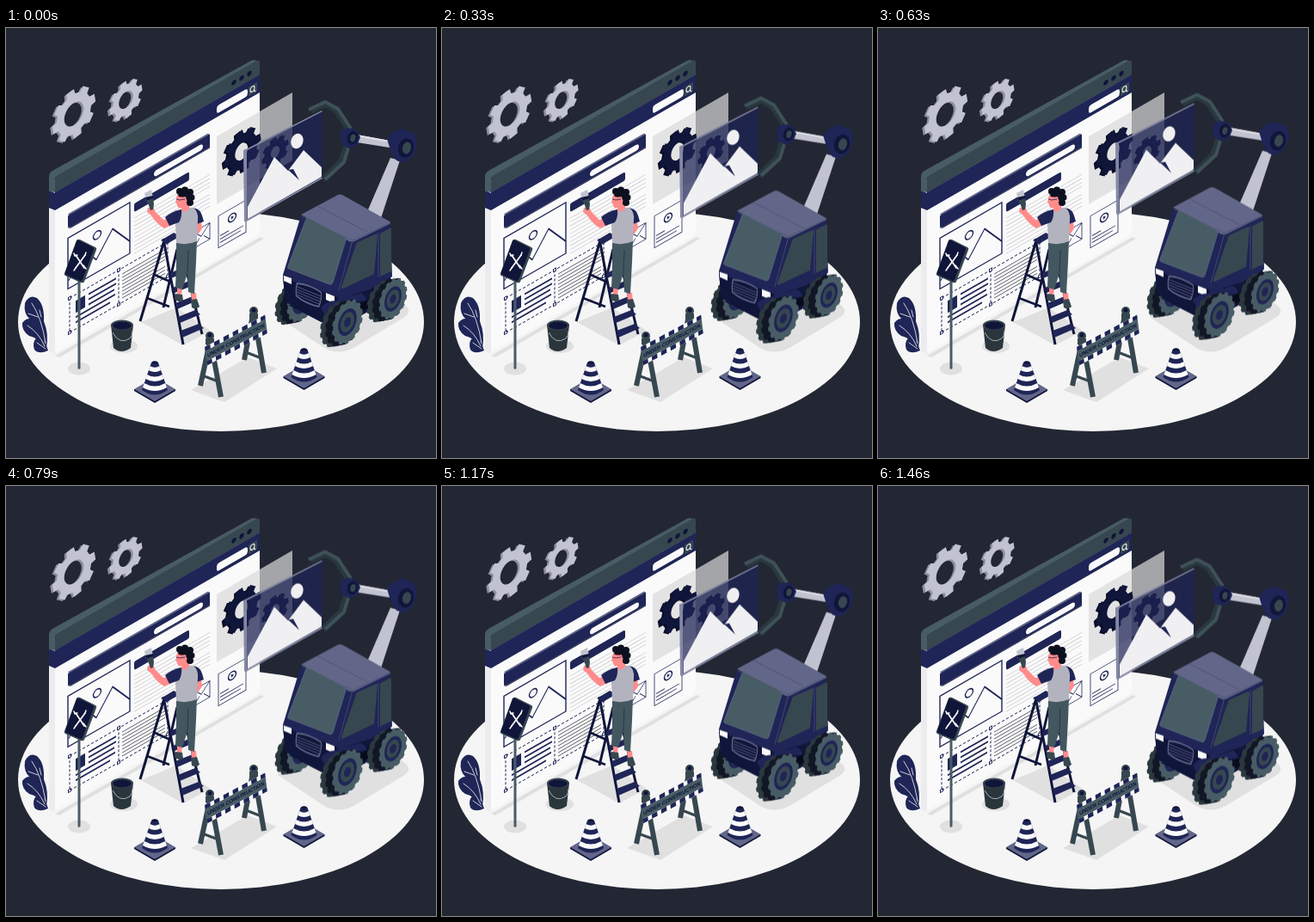
Recreate the animation shown at these times as an HTML page. Size 500 by 500 pixels, loop 1.5 s.

```html
<!DOCTYPE html>
<html lang="en">
<head>
<meta charset="utf-8">
<title>Under construction</title>
<style>
html, body { margin: 0; width: 100%; height: 100%; overflow: hidden; background: #232733; }
svg { display: block; width: 100%; height: 100%; }
.navy { fill: #1f2556; }
.deep { fill: #10153a; }
.slate { fill: #37474f; }
.steel { fill: #485c65; }
.dusk { fill: #62678a; }
.lav { fill: #c2c3d0; }
.white { fill: #fafafa; }
.shade { fill: #e0e0e1; }
.skin { fill: #ff8b8b; }
.ink { fill: none; stroke: #1f2556; stroke-width: 1.4; }
.dark { fill: none; stroke: #10153a; stroke-width: 3; }
.pale { fill: none; stroke: #fafafa; stroke-width: 1; }
.edge { fill: none; stroke: #62678a; stroke-width: .8; }
.thin { stroke-width: .8; }
.round { stroke-linecap: round; stroke-linejoin: round; }
#loader { animation: float 1.5s linear infinite; }
@keyframes float { 50% { transform: translateY(-10px); } }
</style>
</head>
<body>
<svg viewBox="0 0 500 500">
  <defs>
    <g id="cone">
      <path class="deep" d="M-24 33v2L0 49l24-14v-2z"/>
      <path class="dusk" d="M-24 33L0 19l24 14L0 47z"/>
      <path class="navy" d="M-4 2Q0-1 4 2L15 34Q0 45-15 34z"/>
      <path class="white" d="M-5.400 6Q0 9.500 5.400 6L7.100 11Q0 15-7.100 11zM-8.900 16Q0 21 8.900 16L10.600 21Q0 27-10.600 21zM-12.300 26Q0 33 12.300 26L14 31Q0 39-14 31z"/>
      <ellipse class="deep" cy="1.800" rx="3.400" ry="1.500"/>
    </g>
  </defs>

  <ellipse cx="250" cy="341.500" rx="236" ry="127.500" fill="#f5f5f5"/>
  <g class="shade">
    <path d="M57 381L296 243l4 2L62 383z"/>
    <ellipse cx="85" cy="396" rx="13" ry="7.500"/>
    <ellipse cx="137" cy="370" rx="16" ry="8"/>
    <path d="M157 342l49 27 32-17-40-27z"/>
    <path d="M215 421l39 14 61-39-34-13z"/>
    <path d="M316 336q5-12 30-16l90-20 30 24q6 7-4 13l-58 35q-18 9-34 0z"/>
  </g>

  <!-- floating gears -->
  <g transform="translate(76.500 101.500)" fill="#8d8f9d"><path data-gear="29,13,8"/></g>
  <g transform="translate(79 100)" class="lav"><path data-gear="29,13,8"/></g>
  <g transform="translate(137 85)" fill="#8d8f9d"><path data-gear="22,9.500,8"/></g>
  <g transform="translate(139.500 83.500)" class="lav"><path data-gear="22,9.500,8"/></g>

  <!-- browser window -->
  <path fill="#ececef" d="M50 188l7 3v188l-7-3z"/>
  <path class="navy" d="M50 189l7 3v20l-7-3z"/>
  <path class="steel" d="M50 190v-17q0-4 4-7L285 38q4-2 8 1l2 3-238 132v17z"/>
  <g transform="matrix(1 -.5756 0 1 57 191)">
    <path class="white" d="M0 0h238v181q0 5-5 5H0z"/>
    <path class="slate" d="M0 0v-14q0-4 4-4h230q4 0 4 4v14z"/>
    <path class="navy" d="M0 0h238v21H0z"/>
    <g class="deep"><circle cx="208" cy="-8" r="2.800"/><circle cx="217" cy="-8" r="2.800"/><circle cx="226" cy="-8" r="2.800"/></g>
    <rect class="white" x="188" y="8" width="36" height="9" rx="3"/>
    <rect class="slate" x="225" y="7" width="10" height="11" rx="1"/>
    <path class="pale" d="M231 14l2 3M227 12a2.500 3 0 1 0 5 0a2.500 3 0 1 0-5 0"/>
    <path class="dusk" d="M15 34h163l2 3H17z"/>
    <path class="navy" d="M15 36h165v15H18l-3-2z"/>
    <path class="deep" d="M15 49l3 2h162v1H18l-3-2z"/>
    <rect class="white" x="115" y="42" width="57" height="7" rx="3.500"/>
    <rect class="navy" x="92" y="66" width="64" height="10" rx="2"/>
    <rect class="ink" x="15" y="62" width="72" height="59"/>
    <circle class="ink" cx="49" cy="78" r="4.500"/>
    <path class="ink" d="M16 112l17-26 15 20 19-25 20 26"/>
    <path id="copy" fill="none" stroke="#c9c9cf" stroke-width=".8"/>
    <path class="ink" d="M17 133h114v40H17zM74 133v40" stroke-dasharray="3 2" style="stroke-width:1"/>
    <rect class="navy" x="24" y="140" width="11" height="14"/>
    <path class="ink" d="M39 141h32M39 147h32M39 153h30M24 159h46M24 165h40" style="stroke-width:2"/>
    <path id="fine" fill="none" stroke="#30343f" stroke-width=".8"/>
    <g id="grips" fill="#fff" stroke="#1f2556"></g>
    <rect class="ink thin" x="190" y="137" width="32" height="37"/>
    <circle class="ink" cx="206" cy="148" r="4.500"/>
    <path class="navy" d="M205 146l3 2-3 2z"/>
    <path class="ink thin" d="M192 161h10M192 165h27M192 169h24"/>
    <path class="ink thin" d="M161 139h19v19h-19zl9 10 10-10M161 158l7-8M180 158l-7-8"/>
  </g>
  <path d="M245 126l88-51v79l-88 51z" fill="#dadada" fill-opacity=".7"/>
  <g fill="#090d25"><path data-gear="25,10,8" transform="translate(272.500 144.500)"/><path data-gear="17,7,8" transform="translate(312 145)"/></g>
  <g class="deep"><path data-gear="25,10,8" transform="translate(275 143)"/><path data-gear="17,7,8" transform="translate(314 143.500)"/></g>

  <!-- loader -->
  <g id="loader">
    <path class="lav" d="M447 151l11 3-22 67-17-5z"/>
    <path class="lav" d="M408 124l44 8v8l-44-7z"/>
    <path fill="#e0e1e8" d="M408 124l44 8v2l-44-8z"/>
    <path class="navy" d="M443 129l6-7 12-5 15 6 2 12-5 14-11 8-8-3-6-9z"/>
    <ellipse class="deep" cx="465" cy="139.500" rx="9" ry="11.500" transform="rotate(15 465 139.500)"/>
    <ellipse class="slate" cx="466" cy="139.500" rx="5" ry="7" transform="rotate(15 466 139.500)"/>
    <path d="M277 142l91-46v78l-90 51z" fill="#1f2556" fill-opacity=".72"/>
    <path fill="#8588a3" d="M276 142l4-1v83l-3 1z"/>
    <path fill="#8588a3" d="M277 142l90-46 1 1-89 46zM278 224l90-51v2l-90 51z"/>
    <path fill="#f0f0f3" d="M281 222v-14l31-58 16 16 18-24 21 20v11z"/>
    <path class="navy" d="M312 150l29 27-7-13-6 1z"/>
    <ellipse fill="#f0f0f3" cx="338.500" cy="131.500" rx="7" ry="9" transform="rotate(18 338.500 131.500)"/>
    <path fill="none" stroke="#29383e" stroke-width="8" stroke-linejoin="round" d="M354 96l17-8 13 7 15 23M397 135l-7 21-21 20"/>
    <path fill="none" stroke="#3f5159" stroke-width="4" stroke-linejoin="round" d="M352 95l19-9 15 8 15 23M399 136l-6 20-22 20"/>
    <path class="navy" d="M389 121l8-5 11 3 4 8-4 10-9 3-9-5z"/>
    <ellipse class="deep" cx="403" cy="128" rx="6" ry="8" transform="rotate(15 403 128)"/>
    <ellipse class="slate" cx="403.500" cy="128" rx="3" ry="4.500" transform="rotate(15 403.500 128)"/>

    <g data-wheel="343,318,23"></g>
    <path class="deep" d="M383 318l64-31 3 27-53 29-17 6-52-27z"/>
    <path fill="#080b1c" d="M404 324l38-18v9l-36 19z"/>
    <path class="navy" d="M343 218l60 28-16 60-2 31-61-24-2-26z"/>
    <path class="deep" d="M322 290l64 23-2 32-59-26z"/>
    <path class="navy" d="M403 246l44-20 2 63-26 15-17 5-20 9V304z"/>
    <path class="dusk" d="M343 217l43-23q2-1 5 0l55 31q2 2 0 3l-41 20q-3 1-6 0z"/>
    <path class="edge" d="M344 219l59 28 43-20M403 247l-16 58M433 238v52M362 207l58 30" style="stroke:#4b5073"/>
    <path class="steel" d="M349 222q1-2 3-1l42 22q2 1 1 4l-15 49q-1 3-4 2l-47-18q-2-1-1-3z"/>
    <path class="slate" d="M407 252q0-2 2-3l20-9q3-1 3 1l-4 45-36 17q-2 1-2-2z"/>
    <path class="slate" d="M435 239l11-6q2-1 2 1v49l-13 6z"/>
    <path class="edge" d="M349 222q1-2 3-1l42 22q2 1 1 4l-15 49q-1 3-4 2l-47-18q-2-1-1-3z"/>
    <path class="dusk" d="M338 296q15 1 29 11 1 9-3 18-17-4-27-13-1-9 1-16z"/>
    <path class="deep" d="M339 298q14 1 27 10 1 8-3 15-15-4-25-12-1-7 1-13z"/>
    <path class="edge" d="M339 301l27 11M338 304l28 11M338 307l27 11M338 310l26 11"/>
    <path class="white" d="M323 288l9 3v7l-9-4zM372 308l10 4v8l-10-4z"/>
    <path class="navy" d="M366 325q8-9 19-8l27-9q6 2 7 9l-13 1-21 8-10 16z"/>
    <g data-wheel="450,315,23"></g>
    <g data-wheel="397,342,25"></g>
  </g>

  <!-- plant -->
  <g class="navy">
    <path d="M47 372Q41 346 28 339 20 332 22 320 27 309 36 314 45 322 44 341 50 356 47 372z"/>
    <path d="M45 374Q38 360 27 358 18 352 19 343 25 335 33 340 46 350 45 374z"/>
    <path d="M49 375Q38 380 33 374 30 365 36 360 45 361 49 375z"/>
  </g>
  <path class="pale thin round" d="M30 320q11 16 16 46M26 332l11 4M39 328l2 8M25 346q13 8 20 24M36 366l10 7"/>

  <!-- road sign -->
  <path fill="#4a5c64" d="M83.500 288h3v108q-1.500 1.500-3 0z"/>
  <path class="slate" d="M82 247q1-2 4-1l18 9q2 1 1 3l-14 37q-1 2-4 1l-18-8q-2-1-1-3z"/>
  <path class="deep" d="M82 248q1-2 3-1l16 8q2 1 1 3l-13 35q-1 2-3 1l-16-7q-2-1-1-3z"/>
  <path class="pale round" d="M81 264l10 15M92 264L81 279" style="stroke-width:1.800"/>
  <path class="pale round" d="M79 262l1 3 3-1M90 276l3 4M92 264l1-3M81 279l-2 3" style="stroke-width:1.500"/>

  <!-- bucket -->
  <path fill="#2a353c" d="M122 345l3 27q9 8 20 0l3-27z"/>
  <ellipse class="slate" cx="135" cy="345.500" rx="13" ry="6"/>
  <ellipse class="deep" cx="135" cy="346" rx="11" ry="4.500"/>
  <path class="pale" d="M124 354q8 15 20 7 3-3 3-9" style="stroke:#a9abb5"/>

  <!-- ladder -->
  <g class="dark">
    <path d="M184 247l-28 94M199 257l-16 68"/>
    <path d="M164 314l26 10M173 287l18 8" style="stroke-width:2.500"/>
    <path d="M183 245l23 123M200 242l28 114"/>
  </g>
  <path class="navy" d="M180 247l15-9 8 4-16 9zM191 285l18-8 5 5-22 9zM194 302l19-8 5 5-22 9zM197 320l20-8 5 5-23 10zM200 336l20-8 6 5-24 10zM203 352l21-8 6 5-25 11z"/>

  <!-- painter -->
  <path class="skin" d="M199 300l6 1-1 11-5-1zM215 307l6 1 1 11-6-1z"/>
  <path class="slate" d="M197 309l8 1 1 7q-6 3-10-2zM215 316l7-1 3 9q-4 4-9 1z"/>
  <path fill="#435760" d="M198 247l24-1-1 26-2 37-7-2-1-22-6 19-8-2 1-26z"/>
  <path fill="none" stroke="#2b393f" d="M212 258l-1 27"/>
  <path class="skin" d="M221 224l6 1 1 8-5 7-3-2 2-6z"/>
  <path class="navy" d="M217 209q9 1 11 9l2 7-8 3z"/>
  <path class="skin" d="M188 222l5 7-9 4q-10-6-15-15l-5-4 1-5 6-1 3 6 9 9z"/>
  <path fill="#b2b3bf" d="M200 212q10-4 18-3 6 5 5 14l-1 25q-11 5-24 2l-1-22z"/>
  <path class="navy" d="M204 211q-11 2-19 9l5 10 11-4q4-6 3-15z"/>
  <path class="skin" d="M199 194q-1 5-2 9l2 2q0 5 5 4v4q5 2 9-3l1-16z"/>
  <g fill="#0c101f">
    <circle cx="202" cy="190" r="4"/><circle cx="208" cy="188.500" r="4"/><circle cx="214" cy="191" r="4"/>
    <circle cx="216" cy="197" r="3.500"/><circle cx="214" cy="203" r="4"/>
    <path d="M200 194l8-5 8 5-2 12h-3l-2-10q-4 1-8 0z"/>
  </g>
  <circle class="skin" cx="208.500" cy="201" r="2"/>
  <path class="ink thin" d="M198 199l4 1 6-1"/>
  <path class="slate" d="M163 200l8-2 1 7-1 6-3 1-2-6z"/>
  <path class="lav" d="M161 192l8-4 2 9-8 4z"/>
  <path class="deep" d="M162 197l9-2v3l-8 3z"/>

  <!-- barrier -->
  <g fill="none" stroke="#37474f" stroke-width="6">
    <path d="M237 365l-11 51M238 365l12 64M286 339l-9 47M289 338l11 63"/>
    <path d="M228 404l19 7M279 377l18 7" stroke-width="3"/>
  </g>
  <g class="slate"><circle cx="237" cy="358" r="5"/><circle cx="288" cy="329" r="5"/><path d="M232 361h10v7h-10zM283 332h10v7h-10z"/></g>
  <g class="deep"><circle cx="237" cy="357" r="2.500"/><circle cx="288" cy="328" r="2.500"/></g>
  <g transform="matrix(.9 -.48 .12 1 231 371)">
    <path stroke="#fafafa" stroke-width="5" d="M0 2.500h78M0 19h78"/>
    <path stroke="#1f2556" stroke-width="5" stroke-dasharray="7 5" d="M0 2.500h78M0 19h78"/>
    <path class="steel" d="M0 5h78v11.500H0z"/>
    <text class="deep" x="39" y="13" text-anchor="middle" font-family="Liberation Sans, Arial, sans-serif" font-size="6.200" font-weight="700">UNDER CONSTRUCTION</text>
  </g>

  <use href="#cone" x="173" y="387"/>
  <use href="#cone" x="346.500" y="372"/>
</svg>
<script>
const $ = id => document.getElementById(id);

// Toothed ring drawn on the isometric plane.
function gearPath(r, hole, teeth, depth = .2, sx = .87, slope = .5) {
  const at = (rad, a) => {
    const x = rad * Math.cos(a), y = rad * Math.sin(a);
    return (x * sx).toFixed(1) + ' ' + (y - x * slope).toFixed(1);
  };
  const step = 2 * Math.PI / teeth, low = r * (1 - depth), pts = [];
  for (let i = 0; i < teeth; i++) {
    const a = i * step - .18;
    pts.push(at(low, a - step * .32), at(r, a - step * .22), at(r, a + step * .22), at(low, a + step * .32));
  }
  const ring = [];
  for (let i = 0; hole && i < 32; i++) ring.push(at(hole, -i * Math.PI / 16));
  return 'M' + pts.join('L') + 'Z' + (hole ? 'M' + ring.join('L') + 'Z' : '');
}

document.querySelectorAll('[data-gear]').forEach(p => {
  p.setAttribute('d', gearPath(...p.dataset.gear.split(',').map(Number)));
  p.setAttribute('fill-rule', 'evenodd');
});

// Tyre: tread layers pushed back from the face, then rim and hub.
document.querySelectorAll('[data-wheel]').forEach(g => {
  const [x, y, r] = g.dataset.wheel.split(',').map(Number);
  const disc = (rad, back, fill, teeth = 32, depth = 0) =>
    `<path fill="${fill}" transform="translate(${x - back} ${y + back * .2})" d="${gearPath(rad, 0, teeth, depth, .72, .36)}"/>`;
  let s = '';
  for (let k = 14; k > 0; k--) s += disc(r, k, k > 8 ? '#2b393f' : '#121726', 14, .08);
  s += disc(r, 0, '#485c65', 14, .08) + disc(r * .6, 0, '#1f2556');
  g.innerHTML = s + disc(r * .44, 0, '#37474f') + disc(r * .22, 0, '#1f2556');
});

const rows = (n, x, y, gap, w) =>
  Array.from({ length: n }, (_, i) => `M${x} ${y + i * gap}h${i % 5 === 4 ? w * .8 : w}`).join('');
$('copy').setAttribute('d', rows(10, 92, 83, 4.6, 88));
$('fine').setAttribute('d', rows(8, 78, 140, 4, 50));
$('grips').innerHTML = [17, 74, 131].map(x => [133, 173].map(y =>
  `<rect x="${x - 1.5}" y="${y - 1.5}" width="3" height="3"/>`).join('')).join('');
</script>
</body>
</html>
```
